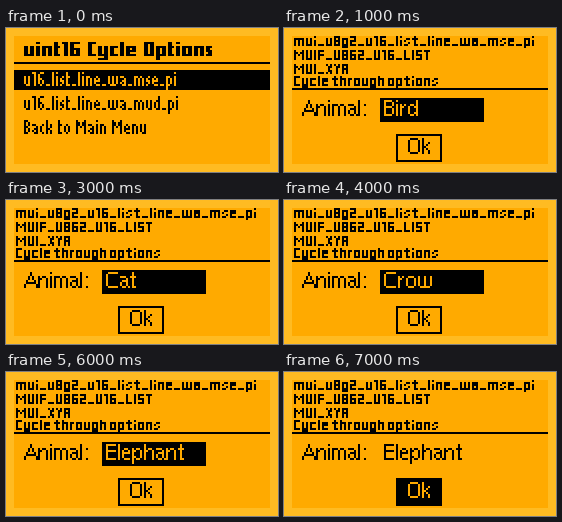
An HTML page with a canvas for the animation above (8 s loop, 272x144 px).

```html
<!DOCTYPE html>
<html lang="en">
<head>
<meta charset="utf-8">
<title>Display menu</title>
<style>
  html, body { margin: 0; width: 100%; height: 100%; overflow: hidden; background: #fb2; }
  canvas { display: block; width: 272px; height: 144px; image-rendering: pixelated; }
</style>
</head>
<body>
<canvas id="screen" width="272" height="144" role="img" aria-label="Menu on a small display"></canvas>
<script>
const ctx = document.getElementById("screen").getContext("2d");
const AMBER = "#fa0", BORDER = "#fb2", BLACK = "#000";

// Pen strokes shared by all fonts. Each point is a column and a row:
// columns l, c, r (p and q lie one inside the edges), rows t(op), i (stem), h(alf),
// x(-height), w (below x), m(iddle), k (crossbar), v (above base), b(ase), d(escender).
// A capital column marks a corner that round fonts leave open.
const STROKES = {
  a: "lx Rx rb, rm Lm Lb rb", c: "rx Lx Lb rb", d: "rt rb Lb Lx rx", e: "rb Lb Lx Rx rm lm",
  g: "rx Rd ld, rb Lb Lx rx", h: "lt lb, lx Rx rb", i: "lt, li lb", k: "lt lb, pm rx, pm rv rb",
  l: "lt lb", m: "lb lx Cx cb, Cx Rx rb", n: "lb lx Rx rb", o: "Lx Rx Rb Lb Lx",
  p: "ld lx Rx Rb lb", r: "lb lx rx", s: "rx Lx lm rm Rb lb", t: "ct cb rb, lx rx",
  u: "lx Lb rb rx", w: "lx Lb Rb rx, cx cb", y: "lx Lb rb, rx Rd ld",
  A: "lb lt rt rb, lh rh", B: "lt Rt Rh lh, lh Rh Rb lb lt", C: "rt Lt Lb rb",
  D: "lt Rt Rb lb lt", E: "rt lt lb rb, lh rh", F: "rt lt lb, lh rh",
  G: "rt Lt Lb Rb rh ch", I: "lt lb", L: "lt lb rb", M: "lb lt ch rt rb",
  O: "Lt Rt Rb Lb Lt", S: "rt Lt lh rh Rb lb", T: "lt rt, ct cb", U: "lt Lb Rb rt",
  X: "lt rb, rt lb", Y: "lt ch rt, ch cb",
  1: "lt rt rb", 2: "lt Rt rh lh lb rb", 6: "rt Lt Lb Rb Rh lh", 8: "Lt Rt Rb Lb Lt, lh rh",
  _: "lb rb", ":": "lx, lb"
};

// widths lists the letters that differ from the usual width, strokes the special shapes
const font = options => ({ cap: 7, x: 5, drop: 2, usual: 3, pen: 1, space: 2,
  round: false, indent: "", tight: "", ...options, strokes: { ...STROKES, ...options.strokes } });
const titleFont = font({ usual: 4, pen: 2, space: 3, widths: { 1: "il", 2: "t1s", 3: "cC" } });
const menuFont = font({ round: true, widths: { 1: "il", 2: "t1cs_", 5: "mwM" } });
const smallFont = font({ cap: 5, x: 4, drop: 1, space: 1,
  widths: { 1: "ilI", 2: "1r", 5: "mwM" }, strokes: { s: "rx cx lm, rv cb lb" } });
const plainFont = font({ cap: 8, x: 6, usual: 5, round: true, indent: "BCDEO:", tight: "Aa",
  widths: { 1: "il:", 3: "rt", 4: "eks", 6: "CDO", 7: "mwA" },
  strokes: {
    A: "lb ct rb, pk qk", a: "lx Qx qv, qm Lm Lb Qb, rb", d: "rt rb, qw cx Lx Lb cb qv",
    g: "rx Rd ld, qw cx Lx Lb cb qv", h: "lt lb, pw cx Rx rb", n: "lx lb, pw cx Rx rb",
    p: "lx ld, pw cx Rx Rb cb pv", r: "lx lb, pw rx"
  } });

function widthOf(f, letter) {
  const special = Object.keys(f.widths).find(w => f.widths[w].includes(letter));
  return Number(special || f.usual);
}

function drawGlyph(f, letter, left, base, width) {
  const cols = { l: 0, p: 1, c: (width - 1) >> 1, q: width - 2, r: width - 1 };
  const rows = { t: -f.cap, i: 2 - f.cap, h: Math.floor((-f.cap - 1) / 2), x: -f.x, w: 1 - f.x,
    m: Math.floor((-f.x - 1) / 2), k: -3, v: -2, b: -1, d: f.drop - 1 };
  for (const stroke of f.strokes[letter].split(", ")) {
    const points = stroke.split(" ").map(([col, row]) => ({
      x: cols[col.toLowerCase()], y: rows[row], open: f.round && col < "a"
    }));
    points.forEach((to, i) => {
      const from = points[Math.max(0, i - 1)];
      const dx = to.x - from.x, dy = to.y - from.y;
      const steps = Math.max(Math.abs(dx), Math.abs(dy));
      for (let k = 0; k <= steps; k++) {
        if ((k === 0 && from.open) || (k === steps && to.open)) continue;
        const along = steps ? k / steps : 0;
        ctx.fillRect(left + Math.round(from.x + dx * along),
          base + Math.round(from.y + dy * along), f.pen, 1);
      }
    });
  }
}

function write(f, text, x, base, color = BLACK) {
  ctx.fillStyle = color;
  for (const letter of text) {
    if (letter === " ") { x += f.space; continue; }
    const width = widthOf(f, letter);
    if (f.indent.includes(letter)) x++;
    drawGlyph(f, letter, x, base, width);
    x += width + f.pen - (f.tight.includes(letter) ? 1 : 0);
  }
}

function box(x, y, w, h, color = BLACK) {
  ctx.fillStyle = color;
  ctx.fillRect(x, y, w, h);
}

function drawMenu() {
  write(titleFont, "uint16 Cycle Options", 5, 10);
  box(0, 13, 128, 1);
  box(0, 17, 128, 10);
  write(menuFont, "u16_list_line_wa_mse_pi", 5, 25, AMBER);
  write(menuFont, "u16_list_line_wa_mud_pi", 5, 37);
  write(menuFont, "Back to Main Menu", 5, 49);
}

function drawForm(animal, onButton) {
  write(smallFont, "mui_u8g2_u16_list_line_wa_mse_pi", 1, 5);
  write(smallFont, "MUIF_U8G2_U16_LIST", 1, 12);
  write(smallFont, "MUI_XYA", 1, 19);
  write(smallFont, "Cycle through options", 1, 25);
  box(0, 26, 128, 1);
  write(plainFont, "Animal:", 5, 40);
  if (!onButton) box(44, 31, 52, 12);
  write(plainFont, animal, 45, 40, onButton ? BLACK : AMBER);
  box(52, 49, 23, 14);
  if (!onButton) box(53, 50, 21, 12, AMBER);
  write(plainFont, "Ok", 57, 59, onButton ? AMBER : BLACK);
}

const animals = ["Bird", "Bison", "Cat", "Crow", "Dog", "Elephant"];

function draw(now) {
  const second = Math.floor(now / 1000) % 8;
  ctx.setTransform(2, 0, 0, 2, 8, 8);
  box(-4, -4, 136, 72, BORDER);
  box(0, 0, 128, 64, AMBER);
  if (second === 0) drawMenu();
  else drawForm(animals[Math.min(second, animals.length) - 1], second === 7);
}

const start = performance.now();
function tick() {
  draw(performance.now() - start);
  requestAnimationFrame(tick);
}
tick();
</script>
</body>
</html>
```
